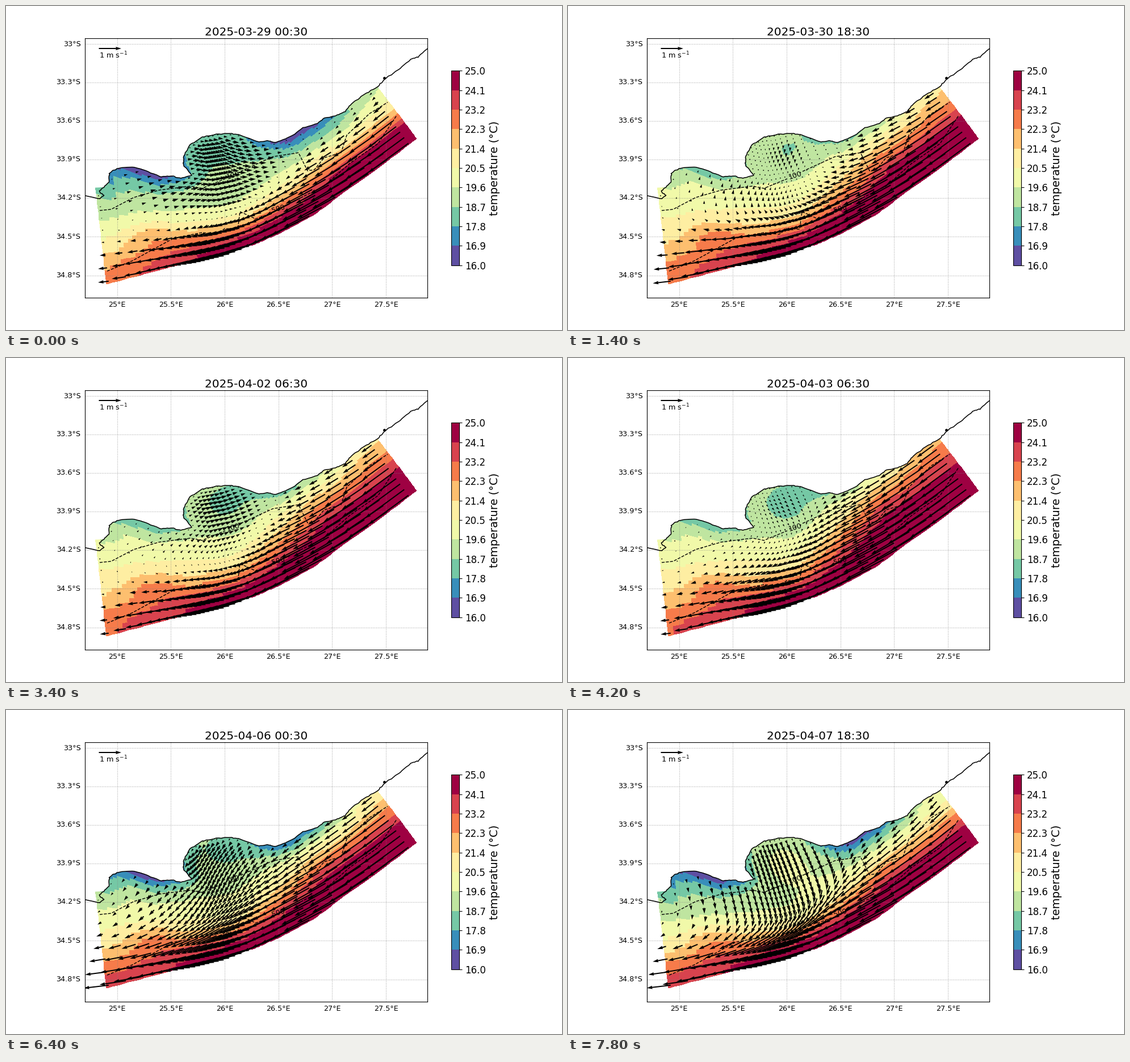
These frames come from a looping animation (979 by 572 pixels, 8 s). A matplotlib script:

```python
import numpy as np
import matplotlib.pyplot as plt
from matplotlib.animation import FuncAnimation
from matplotlib.colors import BoundaryNorm
from matplotlib.path import Path

W, H, FRAMES, STEP = 979, 572, 40, 200
L, R, TOP, BOT = 139.3, 741.8, .1 * H, .9 * H

# Map lines, in stage pixels
COAST = [
    (140, 335), (165, 340), (172, 335), (164, 327), (172, 320), (181, 311), (182, 295),
    (195, 287), (222, 284), (240, 288), (270, 301), (290, 300), (308, 304), (327, 299),
    (312, 280), (313, 265), (324, 245), (345, 232), (370, 226), (395, 225), (412, 228),
    (445, 240), (460, 238), (475, 241), (500, 231), (523, 215), (548, 208), (560, 198),
    (580, 194), (597, 186), (608, 173), (630, 157), (656, 142), (666, 130), (690, 113),
    (713, 94), (725, 90), (743, 75)]
SHELF_100 = [
    (165, 361), (185, 359), (225, 338), (270, 325), (325, 318), (345, 322), (386, 305),
    (413, 292), (470, 266), (515, 259), (531, 291), (543, 289), (560, 268), (590, 259),
    (600, 228), (640, 190), (672, 170)]
SHELF_500 = [
    (178, 468), (222, 450), (295, 410), (345, 400), (372, 403), (385, 393), (408, 394),
    (412, 363), (440, 376), (466, 366), (492, 352), (560, 318), (605, 278), (655, 243),
    (688, 193)]

# Curvilinear grid: offshore edge, from which columns lean landward
EDGE = np.transpose([(177, 491), (300, 458), (385, 437), (440, 420), (480, 402),
                     (540, 370), (600, 325), (650, 290), (723, 234)])
ROWS, SHRINK = 23, .97


def lean(x0):
    return np.radians(np.interp(x0, [177, 723], [6.5, 37]))


def grid(k, j):
    """Position, column foot and offshore distance for column k, row j."""
    x0 = np.clip(410 + 8.5 * k + .04 * k ** 3, 177, 723)
    y0 = np.interp(x0, *EDGE)
    reach = np.interp(x0, [177, 300, 400, 480, 723], [405, 270, 215, 205, 212])
    v = np.clip((1 - SHRINK ** j) / (1 - SHRINK ** ROWS), 0, 1)[:, None]
    d = v * reach
    return x0 - d * np.sin(lean(x0)), y0 - d * np.cos(lean(x0)), x0 + 0 * d, d


rng = np.random.default_rng(4)
pts = np.array(COAST, float)
s = np.linspace(0, len(pts) - 1, 6 * len(pts) - 5)
shore = np.column_stack([np.interp(s, np.arange(len(pts)), c) for c in pts.T])
shore += rng.normal(0, .4, shore.shape)


class Site:
    """Fixed shape functions of the ocean model at a set of places."""

    def __init__(self, x, y, x0, d):
        gap = np.hypot(x[..., None] - shore[:, 0], y[..., None] - shore[:, 1])
        self.c = gap.min(-1)
        self.x0, self.d = x0, d

        def bump(cx, cy, rx, ry):
            return np.exp(-((x - cx) / rx) ** 2 - ((y - cy) / ry) ** 2)

        self.bay = bump(385, 260, 70, 60)
        self.eddy = bump(255, 402, 45, 25)
        self.upwell = (bump(245, 290, 85, 60) + bump(525, 230, 100, 60)) * np.exp(-self.c / 28)

    def warm(self, east):
        """Share of the warm current, whose eastern width varies."""
        return np.exp(-(self.d / np.interp(self.x0, [177, 420, 580], [75, 49, east])) ** 2)

    def temperature(self, p, frame):
        core = np.interp(self.x0, [177, 420, 600], [22.7 + .9 * frame / FRAMES, 24.9, 25.7])
        cold = p["shelf"] + (p["bay"] - p["shelf"]) * self.bay - p["cool"] * self.upwell
        return cold + (core - cold) * self.warm(p["width"]) + self.eddy

    def flow(self, p):
        jet = np.interp(self.x0, [177, 400, 723], [p["jet"], 64, 88])
        jet = jet * self.warm(1.1 * p["width"])
        shelf = np.interp(self.x0, [160, 350, 480, 580], [.2, 1, 1, .4])
        shelf = shelf * (1 - self.warm(p["width"])) * (1 - self.bay)
        calm = 1 - np.exp(-self.c / 8)
        u = p["su"] * shelf + p["bu"] * self.bay
        v = p["sv"] * shelf + p["bv"] * self.bay
        return (u * calm - jet * np.cos(lean(self.x0)),
                v * calm + jet * np.sin(lean(self.x0)))


# State of the sea at a few moments: shelf and bay temperature, coastal cooling,
# current width, western jet, then shelf and bay flow in pixels
NAMES = "frame shelf bay cool width jet su sv bu bv".split()
STATES = np.array([
    (0, 19.3, 18.7, 3.4, 65, 18, 14, -4, 14, 3),
    (7, 20.3, 18.8, 2.3, 85, 31, 3, -10, -1, 8),
    (13, 20.3, 18.8, 2.8, 70, 12, 15, -13, 18, -11),
    (21, 20.3, 18.5, 2.4, 108, 17, -4, 3, 5, 4),
    (26, 20.3, 19.0, 2.0, 90, 36, -16, 4, -9, 3),
    (32, 19.9, 18.8, 3.8, 85, 44, -10, 13, -8, 13),
    (39, 19.3, 19.9, 3.4, 75, 42, 4, 16, 8, 14)])


def state(frame):
    return {n: np.interp(frame, STATES[:, 0], c) for n, c in zip(NAMES, STATES.T)}


# Three cells per arrow each way
ex, ey, _, _ = grid(np.arange(-14 - 1 / 6, 16.6, 1 / 3), np.arange(0, ROWS + .1, 1 / 3))
cells = Site(*grid(np.arange(-14, 16.4, 1 / 3), np.arange(1 / 6, ROWS, 1 / 3)))

first, last = COAST.index((172, 320)), COAST.index((656, 142))
sea = Path([(150, 321)] + COAST[first:last + 1]
           + [(740, 142), (740, 520), (150, 520), (150, 321)])
spots = [a.ravel() for a in grid(np.arange(-14, 17), np.arange(ROWS) + 1 / 6)]
wet = sea.contains_points(np.column_stack(spots[:2]))
spots = [a[wet] for a in spots]
arrows = Site(*spots)

# The small surplus keeps float rounding from losing a pixel
fig = plt.figure(figsize=(W / 100 + 1e-5, H / 100 + 1e-5), dpi=100, facecolor="white")
ax = fig.add_axes([L / W, .1, (R - L) / W, .8])
ax.set(xlim=(L, R), ylim=(BOT, TOP), xticks=[], yticks=[])

levels = np.linspace(16, 25, 11)
mesh = ax.pcolormesh(ex, ey, np.zeros((len(ex) - 1, ex.shape[1] - 1)), zorder=1,
                     cmap=plt.get_cmap("Spectral_r", 10), norm=BoundaryNorm(levels, 10))
mesh.set_clip_path(sea, ax.transData)

dots = dict(color="gray", lw=.8, ls=":", alpha=.7, zorder=2)
for k in range(6):
    x = 195.8 + 94.65 * k
    ax.axvline(x, **dots)
    ax.text(x, 527.5, f"{25 + k / 2:g}°E", size=9.2, ha="center", va="center")
for k in range(7):
    y = 67.2 + 67.7 * k + .06 * k * k
    ax.axhline(y, **dots)
    ax.text(131.5, y, f"{33 + .3 * k:g}°S", size=9.2, ha="right", va="center")

for line, gap in [(SHELF_100, 7), (SHELF_500, 10)]:
    for part in (line[:gap], line[gap:]):
        ax.plot(*zip(*part), "k--", lw=1, zorder=3)
for x, y, depth in [(400, 299, "100"), (479, 358, "500")]:
    ax.text(x, y, depth, size=9, rotation=17, ha="center", va="center", zorder=3)

ax.plot(*shore.T, "k", lw=1.1, zorder=5)
ax.plot(666, 127.5, "ko", ms=2.5, zorder=5)

style = dict(angles="xy", scale_units="xy", scale=1, units="dots", width=2, color="k")
flow = ax.quiver(*spots[:2], 0 * spots[0], 0 * spots[1], zorder=4, **style)
ax.quiver([163.5], [75], [39.5], [0], zorder=6, **style)
ax.text(164, 92, r"1 m s$^{-1}$", size=9.3, va="baseline", zorder=6)
title = ax.text((L + R) / 2, 52, "", size=14.4, ha="center", va="baseline")

bar = fig.colorbar(mesh, cax=fig.add_axes([.8005, .2, .015, .6]), ticks=levels)
bar.ax.set_yticklabels([f"{v:.1f}" for v in levels], size=12)
bar.ax.minorticks_off()
bar.set_label("temperature (°C)", size=14)

start = np.datetime64("2025-03-29T00:30")


def draw(frame):
    now = state(frame)
    mesh.set_array(cells.temperature(now, frame))
    flow.set_UVC(*arrows.flow(now))
    title.set_text(str(start + np.timedelta64(360 * frame, "m")).replace("T", " "))
    return mesh, flow, title


anim = FuncAnimation(fig, draw, frames=FRAMES, interval=STEP, repeat=True, repeat_delay=0)
plt.show()
```
